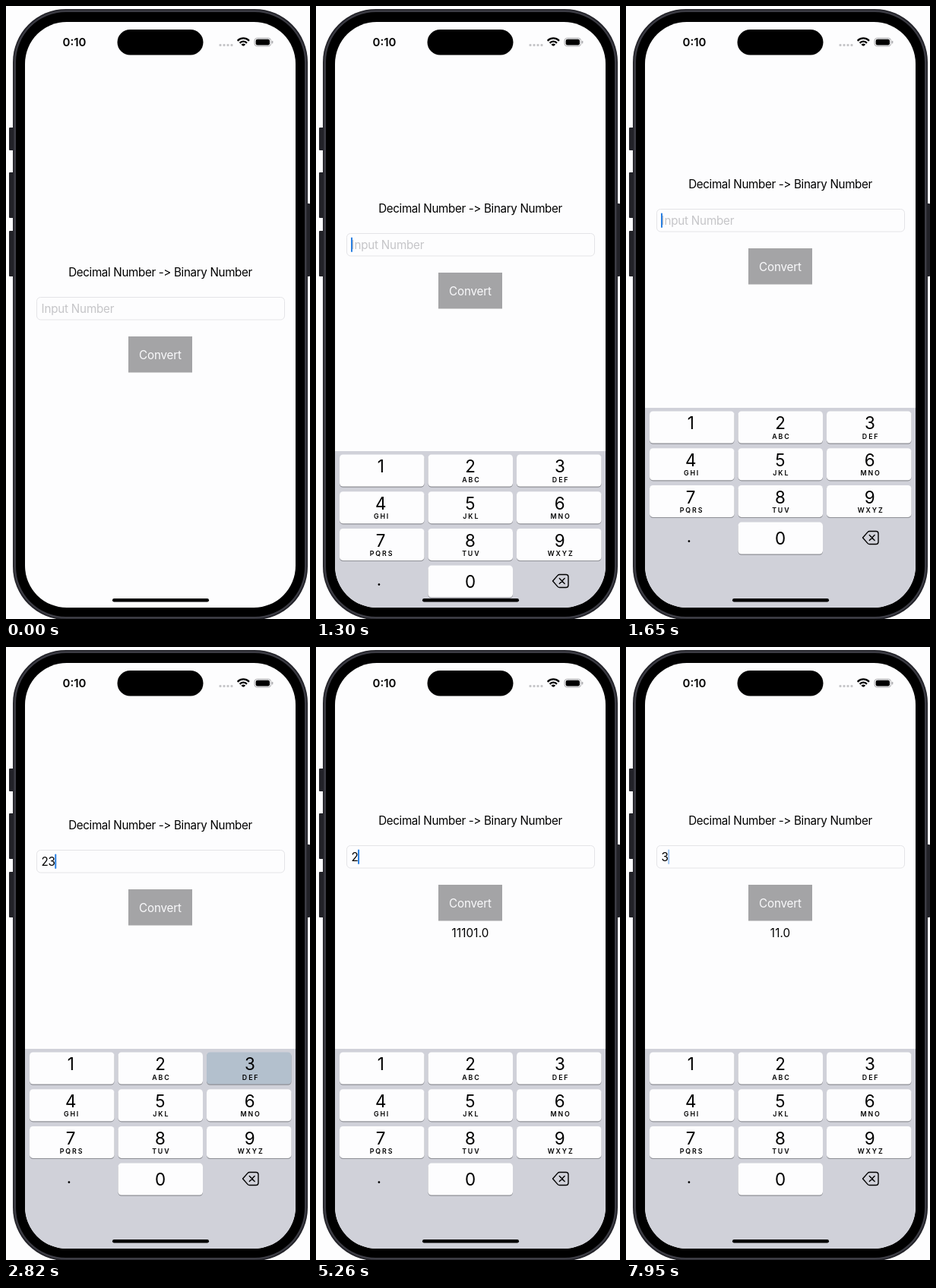
An HTML page with a canvas for the animation above (7.99 s loop, 400 by 807 pixels).

```html
<!DOCTYPE html>
<html lang="en">
<head>
<meta charset="utf-8">
<title>Number converter</title>
<style>
html, body { margin: 0; width: 100%; height: 100%; overflow: hidden; background: #fdfdfe; }
canvas { display: block; width: 400px; height: 807px; }
</style>
</head>
<body>
<canvas id="stage"></canvas>
<script>
const LOOP = 7990;
const FONT = 'Inter, "Open Sans", sans-serif';
const PAPER = '#fdfdfe', INK = '#000', BOARD = '#d0d1d9', PRESSED = '#b3c0cd';
const FAINT = '#c5c5c8', EDGE = '#222228';
const SCREEN = [25, 21, 356, 771, 55];
const MID = 203;
const KEYS = ['', 'ABC', 'DEF', 'GHI', 'JKL', 'MNO', 'PQRS', 'TUV', 'WXYZ'];

// Times in ms
const FOCUS = 1240, KEYBOARD = 1143;
const TYPING = [[FOCUS, ''], [2400, '2'], [2760, '23'], [5130, '2'], [5390, ''], [6410, '3']];
const RESULTS = [[3640, '11101.0'], [7250, '11.0']];
const PRESSES = [[2330, 2470, '2'], [2700, 2870, '3'], [5080, 5180, 'del'], [5340, 5430, 'del'], [6350, 6500, '3']];

const canvas = document.getElementById('stage');
const ctx = canvas.getContext('2d');
const scale = window.devicePixelRatio || 1;
canvas.width = 400 * scale;
canvas.height = 807 * scale;

const latest = (events, t) => events.filter(e => e[0] <= t).pop();
const isPressed = (name, t) => PRESSES.some(([from, to, key]) => key === name && t >= from && t < to);

function box(x, y, w, h, r, fill) {
  ctx.beginPath();
  ctx.roundRect(x, y, w, h, r);
  ctx.fillStyle = fill;
  ctx.fill();
}

function text(str, x, y, size, { color = INK, weight = 400, align = 'center', spacing = 0 } = {}) {
  ctx.font = `${weight} ${size}px ${FONT}`;
  ctx.letterSpacing = spacing + 'px';
  ctx.textAlign = align;
  ctx.fillStyle = color;
  // y is the middle of the capital letters
  ctx.fillText(str, x + (align === 'center' ? spacing / 2 : 0), y + size * 0.364);
}

// Critically damped spring, 0 to 1
function spring(ms) {
  const p = Math.max(0, ms) * 0.01826;
  return 1 - Math.exp(-p) * (1 + p);
}

function caretAlpha(age) {
  const fade = 180, hold = 430, period = 1010;
  if (age < hold) return 1;
  const phase = (age - hold) % period;
  if (phase < fade) return 1 - phase / fade;
  if (phase < 310) return 0;
  return Math.min(1, (phase - 310) / fade);
}

function drawPhone() {
  for (const [y, h] of [[160, 30], [219, 60], [296, 60]]) box(4, y, 7, h, 1, EDGE);
  box(394, 260, 6, 96, 1, EDGE);
  box(9, 4, 388, 804, 70, EDGE);
  box(10.5, 5.5, 385, 801, 69, '#3c3c44');
  box(13, 8, 380, 796, 66, INK);
  box(...SCREEN, PAPER);
}

function drawStatus() {
  text('0:10', 90, 47.8, 15, { weight: 600 });
  box(146.5, 31, 113, 33.5, 16.75, INK);
  for (let i = 0; i < 4; i++) box(280.5 + i * 5, 50, 3, 3, 1, FAINT);

  ctx.save();
  ctx.beginPath();
  ctx.moveTo(312.3, 53.5);
  ctx.lineTo(302.3, 43.5);
  ctx.lineTo(302.3, 38);
  ctx.lineTo(322.3, 38);
  ctx.lineTo(322.3, 43.5);
  ctx.clip();
  ctx.strokeStyle = INK;
  for (const r of [1.5, 6, 10.2]) {
    ctx.beginPath();
    ctx.arc(312.3, 52.6, r, Math.PI, 0);
    ctx.lineWidth = r < 2 ? 3.4 : 2.2;
    ctx.stroke();
  }
  ctx.restore();

  ctx.beginPath();
  ctx.roundRect(327, 42.3, 21.6, 10.6, 3.4);
  ctx.strokeStyle = '#a5a5a8';
  ctx.lineWidth = 1;
  ctx.stroke();
  box(328.6, 43.8, 18.4, 7.6, 2.2, INK);
  box(349.8, 45.8, 1.5, 3.8, 1, '#a5a5a8');
}

function drawForm(t) {
  const result = latest(RESULTS, t);
  const typed = latest(TYPING, t);
  const lift = 116 * spring(t - KEYBOARD - 18) + (result ? 5.7 : 0);
  const value = typed ? typed[1] : '';

  ctx.save();
  ctx.translate(0, -Math.round(lift));
  text('Decimal Number -> Binary Number', MID + 0.2, 350, 15.2, { spacing: -0.35 });

  ctx.beginPath();
  ctx.roundRect(40.5, 383.5, 326, 29.5, 5);
  ctx.strokeStyle = '#e4e4e7';
  ctx.lineWidth = 1;
  ctx.stroke();
  text(value || 'Input Number', 46.5, 398.5, 15.2,
    { color: value ? INK : FAINT, align: 'left', spacing: -0.2 });
  if (typed) {
    const x = 46 + (value ? ctx.measureText(value).width : 0);
    ctx.globalAlpha = caretAlpha(t - typed[0]);
    box(x, 388.5, 2, 19.5, 1, '#2a80e2');
    ctx.globalAlpha = 1;
  }

  box(161, 435, 84, 47.5, 0, '#a4a4a6');
  text('Convert', MID, 459, 15.2, { color: '#fafafc', spacing: -0.2 });
  if (result) text(result[1], MID, 498, 15.2, { spacing: 0.15 });
  ctx.restore();
}

function drawBackspace(filled) {
  ctx.beginPath();
  ctx.moveTo(311.5, 700);
  ctx.lineTo(318, 692.6);
  ctx.quadraticCurveTo(319, 691.5, 320.5, 691.5);
  ctx.lineTo(329, 691.5);
  ctx.quadraticCurveTo(332, 691.5, 332, 694.5);
  ctx.lineTo(332, 705.5);
  ctx.quadraticCurveTo(332, 708.5, 329, 708.5);
  ctx.lineTo(320.5, 708.5);
  ctx.quadraticCurveTo(319, 708.5, 318, 707.4);
  ctx.closePath();
  ctx.lineWidth = 1.4;
  ctx.lineJoin = 'round';
  ctx.lineCap = 'round';
  ctx.strokeStyle = ctx.fillStyle = INK;
  if (filled) ctx.fill();
  ctx.stroke();

  ctx.beginPath();
  ctx.moveTo(320.3, 696.6);
  ctx.lineTo(327.1, 703.4);
  ctx.moveTo(327.1, 696.6);
  ctx.lineTo(320.3, 703.4);
  ctx.strokeStyle = filled ? BOARD : INK;
  ctx.stroke();
}

function drawKey(digit, col, row, letters, t) {
  const x = 31 + col * 116.5, y = 533.5 + row * 48.7;
  const center = MID + (col - 1) * 117.8;
  box(x, y + 1, 111.5, 42.2, 4.5, '#8f9096');
  box(x, y, 111.5, 42, 4.5, isPressed(digit, t) ? PRESSED : PAPER);
  text(digit, center, y + (row === 3 ? 20.8 : 15.6), 22.4);
  if (letters) text(letters, center + 0.4, y + 32.8, 8.8, { weight: 600, spacing: 1.9 });
}

function drawKeyboard(t) {
  const drop = Math.round(262 * (1 - spring(t - KEYBOARD)));
  ctx.save();
  ctx.translate(0, drop);
  ctx.fillStyle = BOARD;
  ctx.fillRect(25, 529, 356, 263);
  KEYS.forEach((letters, i) => drawKey(String(i + 1), i % 3, Math.floor(i / 3), letters, t));
  drawKey('0', 1, 3, '', t);
  text('.', 83, 698, 22);
  drawBackspace(isPressed('del', t));
  ctx.restore();
}

function draw(t) {
  ctx.setTransform(scale, 0, 0, scale, 0, 0);
  ctx.fillStyle = PAPER;
  ctx.fillRect(0, 0, 400, 807);
  drawPhone();
  ctx.save();
  ctx.beginPath();
  ctx.roundRect(...SCREEN);
  ctx.clip();
  drawStatus();
  drawForm(t);
  if (t >= KEYBOARD) drawKeyboard(t);
  box(140, 780, 127, 4.5, 2.2, INK);
  ctx.restore();
}

const start = performance.now();
function tick() {
  draw((performance.now() - start) % LOOP);
  requestAnimationFrame(tick);
}
tick();
</script>
</body>
</html>
```
